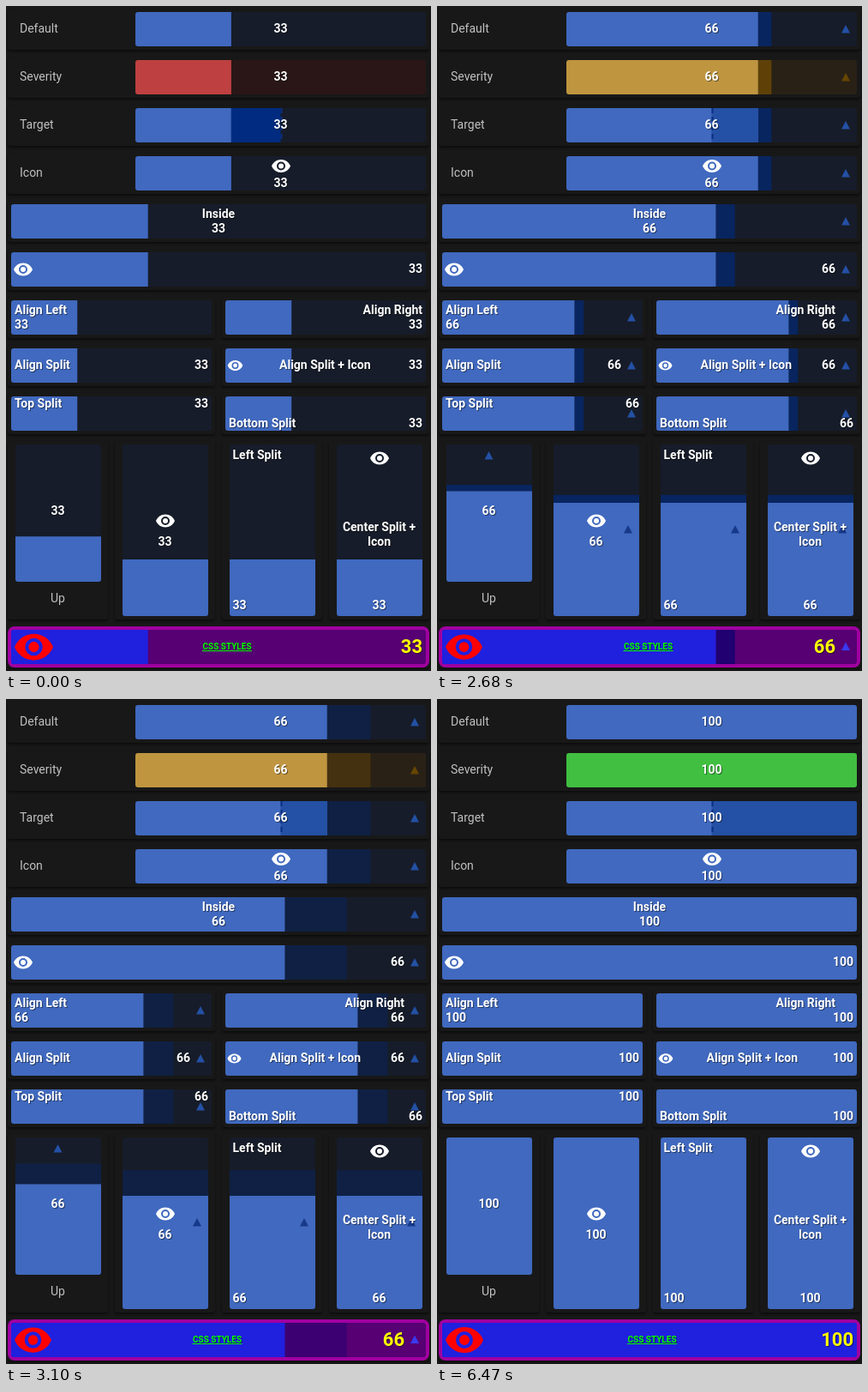
An HTML page with a canvas that plays this animation: 496x775 px, repeating every 9470 ms.

```html
<!DOCTYPE html>
<html lang="en">
<head>
<meta charset="utf-8">
<title>Bar cards</title>
<style>
html, body { margin: 0; width: 100%; height: 100%; overflow: hidden; background: #181818; }
canvas { display: block; }
</style>
</head>
<body>
<canvas id="stage" width="496" height="775"></canvas>
<script>
const ctx = document.getElementById('stage').getContext('2d');
const LOOP = 9470, RISE = 2500, REST = 3470, FULL = 6470;
const STEP_MS = 45.6, LAST_STEP = 16;

// Each palette: bar, track, charge, arrow
const BLUE = ['#4069bf', '#161c29', '#002b80', '#2450a5'];
const CUSTOM = ['#2020df', '#560073', '#000070', '#3a3af0'];
const SEVERITY = {
  33: ['#bf4040', '#2a1616', '#800000', '#660000'],
  66: ['#bf9540', '#2a2116', '#805500', '#664600'],
  100: ['#40bf40', '#162a16', '#008000', '#006600'],
};
const ON_BAR_ARROW = '#17398a';

const EYE = new Path2D('M0-3A3 3 0 0 0 0 3A3 3 0 0 0 0-3M0 5A5 5 0 0 1 0-5A5 5 0 0 1 0 5' +
  'M0-7.5C-5-7.5-9.27-4.39-11 0C-9.27 4.39-5 7.5 0 7.5C5 7.5 9.27 4.39 11 0C9.27-4.39 5-7.5 0-7.5Z');

function box(x, y, w, h, r, fill) {
  ctx.beginPath();
  ctx.roundRect(x, y, w, h, r);
  ctx.fillStyle = fill;
  ctx.fill();
}

function card(x, y, w, h) {
  ctx.save();
  ctx.shadowColor = 'rgba(0,0,0,.5)';
  ctx.shadowOffsetY = 2;
  ctx.shadowBlur = 3;
  box(x, y, w, h, 3, '#181818');
  ctx.restore();
}

function text(str, x, y, align = 'left', { size = 14, weight = 700, color = '#fff', shadow = '#0007' } = {}) {
  ctx.font = `${weight} ${size}px Roboto, sans-serif`;
  ctx.textAlign = align;
  if (shadow) {
    ctx.fillStyle = shadow;
    ctx.fillText(str, x + 1, y + 1);
  }
  ctx.fillStyle = color;
  ctx.fillText(str, x, y);
}

const label = (str, x, y, align) => text(str, x, y, align, { weight: 400, color: '#c0c0c0', shadow: '' });

function eye(x, y, scale = 1, color = '#fff') {
  ctx.save();
  ctx.translate(x, y);
  ctx.scale(scale, scale);
  ctx.fillStyle = color;
  ctx.fill(EYE);
  ctx.restore();
}

function arrow(x, y, color) {
  ctx.beginPath();
  ctx.moveTo(x, y - 5);
  ctx.lineTo(x + 5, y + 4.5);
  ctx.lineTo(x - 5, y + 4.5);
  ctx.fillStyle = color;
  ctx.fill();
}

// Fills the span from..to (0..1) of a bar, along its axis
function span(x, y, w, h, from, to, up, fill) {
  ctx.fillStyle = fill;
  if (up) ctx.fillRect(x, y + h * (1 - to), w, h * (to - from));
  else ctx.fillRect(x + w * from, y, w * (to - from), h);
}

function bar(state, x, y, w, h, { up = false, colors = BLUE, target = 0 } = {}) {
  const [main, track, charge] = colors;
  const level = state.value / 100;
  ctx.save();
  box(x, y, w, h, 3, track);
  ctx.clip();
  if (state.step > 0) {
    ctx.globalAlpha = 0.76 - 0.035 * state.step;
    span(x, y, w, h, level, level + 0.0115 * state.step, up, charge);
    ctx.globalAlpha = 1;
  }
  span(x, y, w, h, 0, level, up, main);
  if (target) {
    span(x, y, w, h, Math.min(level, target), Math.max(level, target), up, level < target ? charge : '#2450a5');
    ctx.strokeStyle = '#0a2f80';
    ctx.lineWidth = 2;
    ctx.setLineDash([6, 4]);
    ctx.beginPath();
    ctx.moveTo(x + w * target + 1, y);
    ctx.lineTo(x + w * target + 1, y + h);
    ctx.stroke();
  }
  ctx.restore();
}

function labelledRows(s) {
  ['Default', 'Severity', 'Target', 'Icon'].forEach((name, i) => {
    const y = 7 + 56 * i;
    const colors = name === 'Severity' ? SEVERITY[s.value] : BLUE;
    card(2, y - 4, 492, 48);
    bar(s, 151, y, 339, 40, { colors, target: name === 'Target' ? 0.5 : 0 });
    label(name, 16, y + 24);
    if (s.rising) arrow(477, y + 20, colors[3]);
    if (name === 'Icon') eye(321, y + 179 - 175 + 7.5);
    text(s.value, 320.5, y + (name === 'Icon' ? 36 : 24), 'center');
  });
}

function wideRows(s) {
  for (const y of [231, 287]) {
    card(2, y - 4, 492, 48);
    bar(s, 6, y, 484, 40);
    if (s.rising) arrow(477, y + 20, BLUE[3]);
  }
  text('Inside', 248, 247, 'center');
  text(s.value, 248, 264, 'center');
  eye(20, 307);
  text(s.value, s.right, 311, 'right');
}

function halfRows(s) {
  for (const y of [343, 399, 455]) {
    for (const x of [6, 256]) {
      card(x - 4, y - 4, 242, 48);
      bar(s, x, y, 234, 40);
      if (s.rising) arrow(x + 221, y + 20, BLUE[3]);
    }
  }
  text('Align Left', 10, 359);
  text(s.value, 10, 376);
  text('Align Right', s.value === 33 ? 486 : 465, 359, 'right');
  text(s.value, s.right, 376, 'right');

  text('Align Split', 10, 423);
  text(s.value, s.right - 250, 423, 'right');
  eye(s.smallEye.x, 419, s.smallEye.scale);
  text('Align Split + Icon', s.splitX, 423);
  text(s.value, s.right, 423, 'right');

  text('Top Split', 10, 468);
  text(s.value, 236, 468, 'right');
  text('Bottom Split', 260, 491);
  text(s.value, 486, 491, 'right');
}

function columns(s) {
  for (let i = 0; i < 4; i++) {
    const x = 11 + 125 * i;
    card(x - 9, 507, 117, 208);
    bar(s, x, 511, 100, i ? 200 : 160, { up: true });
    if (s.rising) i ? arrow(x + 87, 610, ON_BAR_ARROW) : arrow(60.5, 524, BLUE[3]);
  }
  text(s.value, 60.5, 593, 'center');
  label('Up', 60.5, 695, 'center');

  eye(186, 600);
  text(s.value, 185.5, 629, 'center');

  text('Left Split', 264.5, 528);
  text(s.value, 264.5, 703);

  eye(436, 527);
  text('Center Split +', 435.5, 612, 'center');
  text('Icon', 435.5, 629, 'center');
  text(s.value, 435.5, 703, 'center');
}

function customRow(s) {
  card(2, 723, 492, 48);
  box(2, 723, 492, 48, 8, '#a000a0');
  bar(s, 6, 727, 484, 40, { colors: CUSTOM });
  if (s.rising) arrow(477, 746.5, CUSTOM[3]);
  eye(s.bigEye.x, 747, s.bigEye.scale, '#f00');
  text('CSS STYLES', s.styleX, 750, 'center', { size: 10, color: '#0f0' });
  ctx.fillStyle = '#0f0';
  ctx.fillRect(s.styleX - 29, 751, 58, 1);
  text(s.value, s.right, 754, 'right', { size: 22, color: '#ff0' });
}

const LAYOUT = {
  33: { right: 486, splitX: 319, styleX: 258, smallEye: { x: 267.5, scale: 0.8 }, bigEye: { x: 32.5, scale: 2.05 } },
  66: { right: 465, splitX: 307.5, styleX: 246.5, smallEye: { x: 266.5, scale: 0.73 }, bigEye: { x: 31.5, scale: 1.95 } },
  100: { right: 486, splitX: 314.5, styleX: 251, smallEye: { x: 267, scale: 0.76 }, bigEye: { x: 32, scale: 2 } },
};

function draw(t) {
  const value = t < RISE ? 33 : t < FULL ? 66 : 100;
  const charging = t >= RISE && t < REST;
  const step = charging ? Math.min(LAST_STEP, Math.floor((t - RISE) / STEP_MS + 0.1)) : 0;
  const state = { value, step, rising: value === 66, ...LAYOUT[value] };
  ctx.fillStyle = '#181818';
  ctx.fillRect(0, 0, 496, 775);
  for (const part of [labelledRows, wideRows, halfRows, columns, customRow]) part(state);
}

const start = performance.now();
function tick() {
  draw((performance.now() - start) % LOOP);
  requestAnimationFrame(tick);
}
tick();
</script>
</body>
</html>
```
